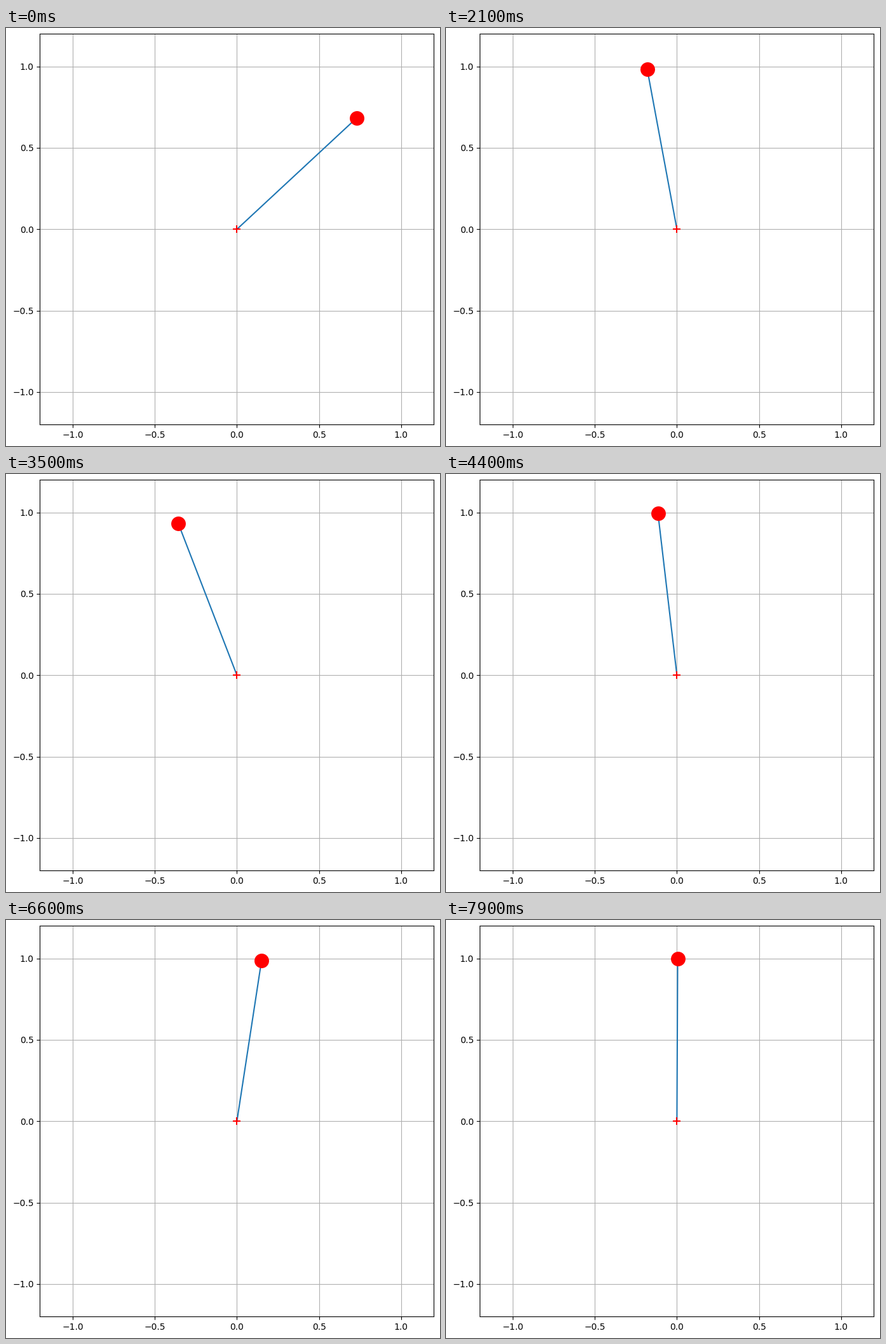
These frames come from a looping animation (683x659 px, 8000 ms). A matplotlib script:

```python
import numpy as np
import matplotlib.pyplot as plt
from matplotlib.animation import FuncAnimation

W, H, DPI = 683, 659, 100
FRAMES, INTERVAL = 80, 100
SUBSTEPS = 100


def swing(angle=0.818, speed=0.37):
    """Angle from the upright position at each frame of a damped swing."""
    dt = INTERVAL / 1000 / SUBSTEPS
    angles = []
    for _ in range(FRAMES):
        angles.append(angle)
        for _ in range(SUBSTEPS):
            pull = 4.5 * np.sin(angle) - 5.57 * angle
            drag = (0.135 + 0.45 * np.cos(angle)) * speed
            speed += (pull - drag) * dt
            angle += speed * dt
    return np.array(angles)


theta = swing()
tips = np.column_stack([np.sin(theta), np.cos(theta)])

fig = plt.figure(figsize=(W / DPI, H / DPI), dpi=DPI, facecolor="white")
ax = fig.add_axes([53.4 / W, 33.72 / H, 620 / W, 616 / H])
ticks = np.arange(-1, 1.01, 0.5)
ax.set(xlim=(-1.2, 1.2), ylim=(-1.2, 1.2), xticks=ticks, yticks=ticks)
ax.grid(True)

rod, = ax.plot([], [], color="tab:blue", lw=1.5)
ax.scatter([0], [0], s=64, marker="+", color="red", lw=1.5, zorder=3)
bob = ax.scatter([0], [1], s=225, color="red", lw=1.5, zorder=3)


def update(i):
    x, y = tips[i]
    rod.set_data([0, x], [0, y])
    bob.set_offsets([[x, y]])
    return rod, bob


anim = FuncAnimation(fig, update, frames=FRAMES, interval=INTERVAL,
                     repeat=True, repeat_delay=0)
plt.show()
```
